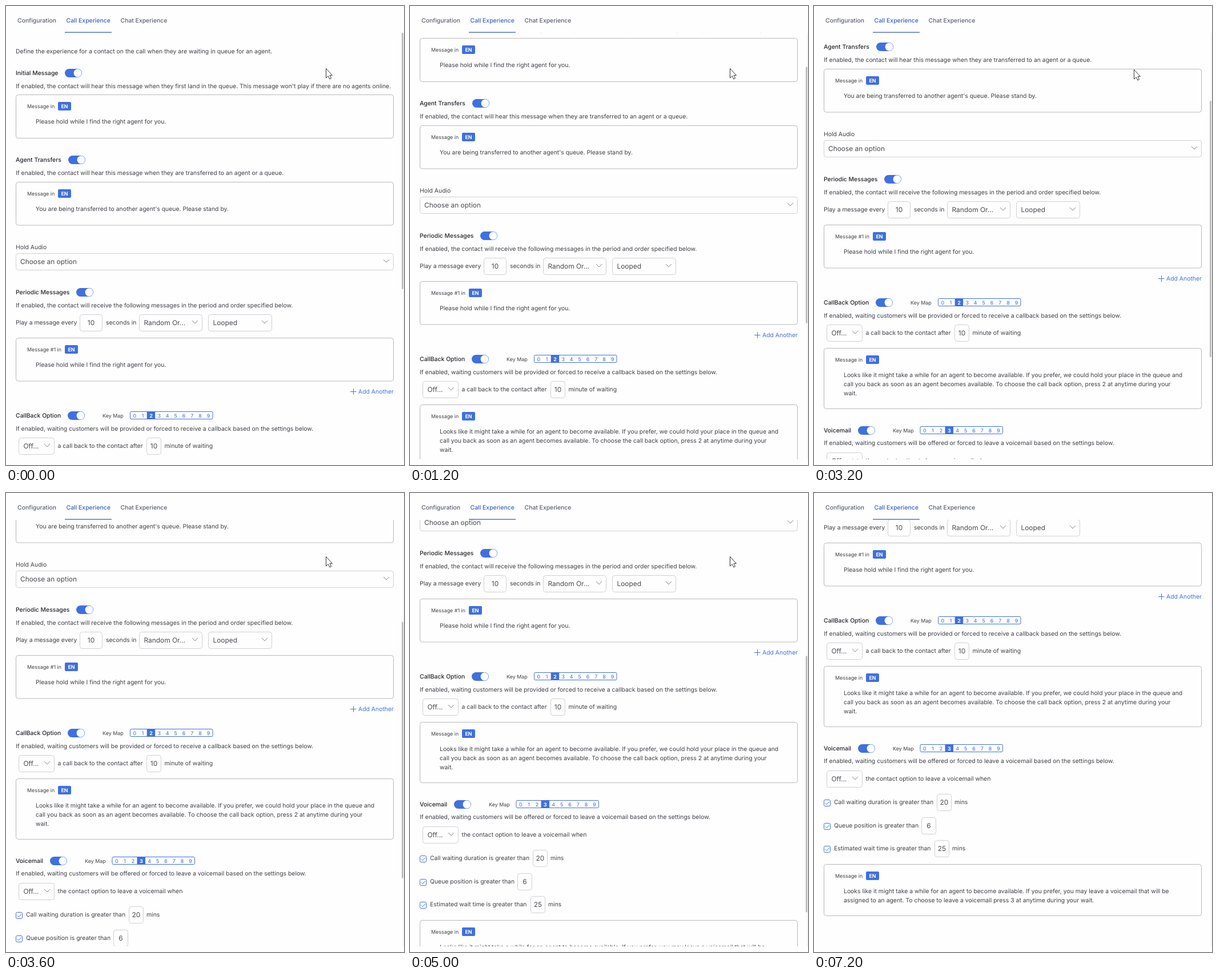
Write an HTML page that moves like this. It is 697 px wide and 804 px high and loops after 7.4 s.

```html
<!DOCTYPE html>
<html lang="en">
<head>
<meta charset="utf-8">
<title>Call Experience settings</title>
<style>
  html, body { margin: 0; width: 100%; height: 100%; overflow: hidden; background: #fefefe; }
  #stage {
    display: block; width: 697px; height: 804px;
    font-family: Inter, "Liberation Sans", sans-serif;
    text-rendering: geometricPrecision;
    animation: scroll 7400ms step-end infinite;
  }
  text { font-size: 10.41px; fill: #3f4047; white-space: pre; }
  .head { font-weight: 500; fill: #25262c; }
  .tab { font-weight: 500; fill: #5d6170; }
  .field { font-size: 11.9px; fill: #4a4b52; }
  .small { font-size: 8.92px; }
  .key { font-size: 8.92px; fill: #3f6ad0; }
  .badge { font-size: 8.92px; font-weight: 700; fill: #fff; }
  .link { fill: #4272dd; }
  .tab.active, .underline { fill: #3f5fc6; }
  .mid { text-anchor: middle; }
  .box { fill: none; stroke: #b9b9bb; }
  .input { fill: none; stroke: #d0d0d3; }
  .blue { fill: #4070df; }
  .line { fill: none; stroke: #4070df; }
  .chevron { fill: none; stroke: #85868c; }

  #page { transform: translateY(calc(var(--y) * -1px)); }
  #thumb { transform: translateY(calc(var(--y) * .602px)); }
  #thumb, #cursor { animation: leave 7400ms step-end infinite; }
  #pointer { animation: nudge 7400ms step-end infinite; }

  @keyframes scroll {
    0% { --y: 0; }
    13.513% { --y: 99; }
    27.027% { --y: 198; }
    48.648% { --y: 297; }
    67.567% { --y: 396; }
    81.081%, 100% { --y: 494; }
  }
  @keyframes nudge {
    0% { transform: translate(560px, 109px); }
    29.729%, 100% { transform: translate(560px, 111px); }
  }
  @keyframes leave {
    0% { opacity: 1; }
    89.189%, 100% { opacity: 0; }
  }
</style>
</head>
<body>
<svg id="stage" viewBox="0 0 697 804" style="--y: 0">
  <g id="tabs"></g>
  <svg y="47" width="697" height="747" viewBox="0 47 697 747"><g id="page"></g></svg>
  <rect x="695" y="47" width="1" height="747" fill="#ededee"/>
  <rect id="thumb" x="693" y="47" width="3" height="449" rx="1" fill="#bebec0"/>
  <g id="cursor">
    <path id="pointer" d="M.5 .5V17L4.3 13.6 6.8 19 9.5 17.8 7.1 12.4H11.4Z" fill="#fff" stroke="#333" stroke-linejoin="round"/>
  </g>
</svg>
<script>
const SIZE = { field: 11.9, small: 8.92, key: 8.92, badge: 8.92 };

// y is the middle of the capital letters
const text = (x, y, str, cls = '') => {
  const size = SIZE[cls.split(' ')[0]] || 10.41;
  return `<text x="${x}" y="${y + size * .364}" class="${cls}">${str}</text>`;
};
const rect = (x, y, w, h, r, cls) =>
  `<rect x="${x}" y="${y}" width="${w}" height="${h}" rx="${r}" class="${cls}"/>`;

const toggle = (x, y) => rect(x, y - 7.5, 30, 15, 7.5, 'blue') +
  `<circle cx="${x + 22.5}" cy="${y}" r="6.9" fill="#fff"/>`;
const heading = (y, str, toggleX) =>
  text(17, y, str, 'head') + toggle(toggleX, y + .5);

const chevron = (x, y) =>
  `<path d="M${x - 5} ${y - 2.5}l5 5 5-5" class="chevron"/>`;
const select = (x, y, w, str, pad = 8.5) =>
  rect(x + .5, y - 14, w - 1, 29, 4, 'input') +
  text(x + pad, y, str, 'field') + chevron(x + w - 13, y - 1);
const number = (x, y, w, n) =>
  rect(x + .5, y - 14, w - 1, 29, 4, 'input') +
  text(x + w / 2, y + .3, n, 'field mid');

const message = (top, h, label, badgeX, lines) =>
  rect(17.5, top, 661, h, 4, 'box') +
  text(37, top + 20, label, 'small') +
  rect(badgeX, top + 12.5, 23, 15, 2, 'blue') +
  text(badgeX + 11.5, top + 20, 'EN', 'badge mid') +
  lines.map((s, i) => text(52, top + 47 + i * 15.9, s)).join('');

const keyMap = (labelX, x, y, picked) => {
  let out = text(labelX, y + .3, 'Key Map', 'small') +
    rect(x + .5, y - 6.5, 144.5, 13, 2, 'line') +
    rect(x + 1 + picked * 14.35, y - 7, 14.5, 14, 0, 'blue');
  for (let i = 0; i < 10; i++)
    out += text(x + 8.3 + i * 14.35, y + .3, i, i === picked ? 'badge mid' : 'key mid');
  return out;
};

const condition = (y, str, inputX, n, unitX) =>
  rect(17.5, y - 3.5, 11, 11, 2, 'line') +
  `<path d="M19.8 ${y + 2.2}l2.4 2.4 4.6-5" class="line"/>` +
  text(35, y, str) + number(inputX, y + .5, 26, n) +
  (unitX ? text(unitX, y, 'mins') : '');

document.getElementById('tabs').innerHTML =
  text(20, 25, 'Configuration', 'tab') +
  text(105.5, 25, 'Call Experience', 'tab active') +
  text(200.5, 25, 'Chat Experience', 'tab') +
  rect(103, 45.5, 82, 1.3, 0, 'underline');

const hold = ['Please hold while I find the right agent for you.'];

document.getElementById('page').innerHTML = [
  text(17, 79.5, 'Define the experience for a contact on the call when they are waiting in queue for an agent.'),

  heading(117, 'Initial Message', 103),
  text(17, 140, "If enabled, the contact will hear this message when they first land in the queue. This message won't play if there are no agents online."),
  message(155.5, 76, 'Message in', 91, hold),

  heading(269, 'Agent Transfers', 109),
  text(17, 292.5, 'If enabled, the contact will hear this message when they are transferred to an agent or a queue.'),
  message(308.5, 75.5, 'Message in', 91, ["You are being transferred to another agent's queue. Please stand by."]),

  text(17, 422, 'Hold Audio'),
  select(17, 447.5, 662, 'Choose an option', 8),

  heading(501, 'Periodic Messages', 123),
  text(17, 524, 'If enabled, the contact will receive the following messages in the period and order specified below.'),
  text(17, 554, 'Play a message every'),
  number(129, 554.5, 40, '10'),
  text(175, 554, 'seconds in'),
  select(233, 554.5, 111, 'Random Or...'),
  select(354, 554.5, 112, 'Looped'),
  message(581.5, 75.5, 'Message #1 in', 103, hold),
  '<path d="M603 675.5h10.5M608.5 670.2v10.6" class="line"/>',
  text(617, 675.5, 'Add Another', 'link'),

  heading(717, 'CallBack Option', 108),
  keyMap(169, 217, 717, 2),
  text(17, 740, 'If enabled, waiting customers will be provided or forced to receive a callback based on the settings below.'),
  select(22, 770.5, 63, 'Off...'),
  text(90.5, 770, 'a call back to the contact after'),
  number(246, 770.5, 26, '10'),
  text(277.5, 770, 'minute of waiting'),
  message(797.5, 106, 'Message in', 91, [
    'Looks like it might take a while for an agent to become available. If you prefer, we could hold your place in the queue and',
    'call you back as soon as an agent becomes available. To choose the call back option, press 2 at anytime during your',
    'wait.']),

  heading(941, 'Voicemail', 77),
  keyMap(138, 185.5, 941, 3),
  text(17, 963.7, 'If enabled, waiting customers will be offered or forced to leave a voicemail based on the settings below.'),
  select(22, 994.5, 63, 'Off...'),
  text(90.5, 994.5, 'the contact option to leave a voicemail when'),
  condition(1035, 'Call waiting duration is greater than', 215, '20', 246),
  condition(1076, 'Queue position is greater than', 188, '6'),
  condition(1116, 'Estimated wait time is greater than', 211, '25', 242),
  message(1144.5, 90, 'Message in', 91, [
    'Looks like it might take a while for an agent to become available. If you prefer, you may leave a voicemail that will be',
    'assigned to an agent. To choose to leave a voicemail press 3 at anytime during your wait.'])
].join('');
</script>
</body>
</html>
```
